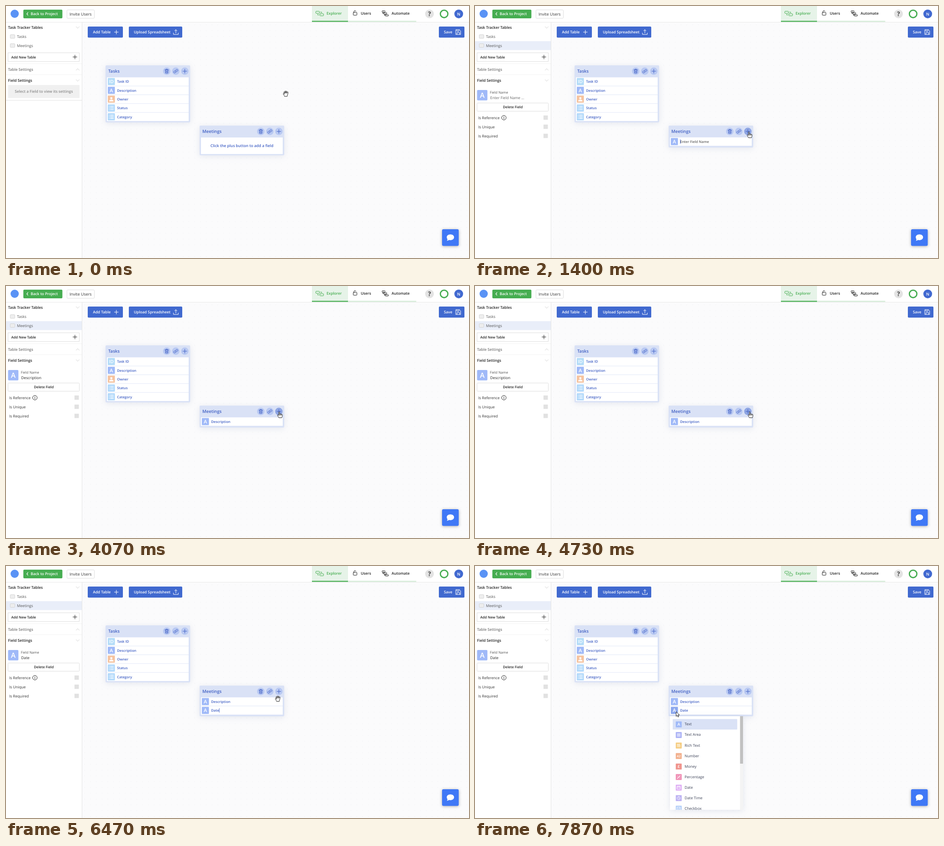
These frames come from a looping animation (1014 by 552 pixels, 8000 ms). An HTML page:

```html
<!DOCTYPE html>
<html lang="en">
<head>
<meta charset="utf-8">
<title>Table editor</title>
<style>
  html, body { margin: 0; width: 100%; height: 100%; overflow: hidden; background: #fff; }
  svg { display: block; width: 100%; height: 100%; }
  text { font: 600 8.24px "Open Sans", "Noto Sans", sans-serif; fill: #222; text-rendering: geometricPrecision; white-space: pre; }
  .reg { font-weight: 400; fill: #555; }
  .med { font-weight: 500; }
  .small { font-size: 7.6px; }
  .blue { fill: #3f5fc4; }
  .grey { fill: #777; }
  .white { fill: #fff; }
  .mid { text-anchor: middle; }
  .title { font-size: 9.5px; }
  .line { fill: none; stroke-linecap: round; stroke-linejoin: round; }
  .box { fill: #fff; stroke: #dedede; }
  .shadow { filter: drop-shadow(0 2px 7px rgba(70, 90, 150, .13)); }
</style>
</head>
<body>
<svg viewBox="0 0 1014 552">
  <defs>
    <pattern id="dots" width="12.68" height="12.68" patternUnits="userSpaceOnUse" x="166" y="35">
      <circle cx="6.3" cy="6.3" r=".7" fill="#ededf1"/>
    </pattern>
    <clipPath id="menuClip"><rect x="427" y="329" width="160" height="205"/></clipPath>
    <g id="plus"><path class="line" d="M-4.3 0H4.3M0-4.3V4.3"/></g>
    <g id="trash"><path class="line" d="M-4-3H4M-1.5-3V-4.4H1.5V-3M-3-3L-2.6 4.3H2.6L3-3M-1-1V2.5M1-1V2.5"/></g>
    <g id="link"><path class="line" d="M-.7 1.7A2.1 2.1 0 0 1-1-1.3L1-3.3A2.1 2.1 0 0 1 4-.3L2.8.9M.7-1.7A2.1 2.1 0 0 1 1 1.3L-1 3.3A2.1 2.1 0 0 1-4 .3L-2.8-.9"/></g>
    <g id="chevron"><path class="line" stroke="#c8c8c8" stroke-width=".8" d="M-3.5-1.7L0 1.7 3.5-1.7"/></g>
  </defs>

  <rect x="166" y="35" width="848" height="517" fill="#fbfbfc"/>
  <rect x="166" y="35" width="848" height="517" fill="url(#dots)"/>

  <!-- header -->
  <rect width="1014" height="35" fill="#fff"/>
  <path d="M0 35.5H1014" stroke="#e8e8e8"/>
  <circle cx="19" cy="17" r="9" fill="#5a93f5"/>
  <rect x="38" y="8" width="85.500" height="19" rx="2" fill="#46ad51"/>
  <path class="line" stroke="#fff" stroke-width="1.2" d="M48 14.500L45.500 17.300 48 20"/>
  <text class="white" x="54" y="20.300">Back to Project</text>
  <rect class="box" x="133.500" y="8.500" width="60" height="18.500" rx="2"/>
  <text class="reg" x="139" y="21" style="font-size:8.87px;fill:#333">Invite Users</text>
  <rect x="670" width="79" height="33" fill="#e6f3e8"/>
  <rect x="670" y="32.500" width="79" height="2.200" fill="#46ad51"/>
  <rect x="749" y="32.500" width="149.500" height="2.200" fill="#d3ecd6"/>
  <g class="line" stroke="#46ad51" stroke-width="1">
    <rect x="678.500" y="11.500" width="8" height="4.500" rx="1"/>
    <rect x="687.500" y="17" width="8" height="4.500" rx="1"/>
    <path d="M688.500 13.500H691.500V15M682.500 18V19.500H685.500"/>
  </g>
  <text x="702" y="19.200" style="fill:#46ad51">Explorer</text>
  <g class="line" stroke="#222">
    <rect x="760.500" y="14" width="8" height="6.200" rx="1"/>
    <path d="M762 14V12.300a2.200 2.200 0 0 1 4.300-.6"/>
    <rect x="823.500" y="10.500" width="7" height="3" rx="1"/>
    <rect x="827" y="14.700" width="7" height="3" rx="1"/>
    <rect x="830.500" y="19" width="7" height="3" rx="1"/>
    <path d="M825 13.500V16.200H827M829 17.700V20.500H830.500"/>
  </g>
  <text x="777" y="19.200">Users</text>
  <text x="844.500" y="19.200">Automate</text>
  <circle cx="927.500" cy="17.300" r="9.500" fill="#e3e3e3"/>
  <text class="mid" x="927.500" y="22.300" style="font-size:13.500px;font-weight:700;fill:#444">?</text>
  <circle cx="959.500" cy="17.300" r="8.200" fill="none" stroke="#46ad51" stroke-width="2.800"/>
  <circle cx="991.500" cy="17.300" r="9.600" fill="#4169d0"/>
  <text class="white mid" x="991.500" y="20.500" style="font-size:8.87px">N</text>

  <!-- canvas buttons -->
  <g fill="#4069cf">
    <rect x="179" y="45" width="77" height="24.300" rx="2"/>
    <rect x="269" y="45" width="117" height="24.300" rx="2"/>
    <rect x="948" y="45" width="56" height="24.300" rx="2"/>
  </g>
  <text class="white" x="190.500" y="60.200">Add Table</text>
  <text class="white" x="280" y="60.200">Upload Spreadsheet</text>
  <text class="white" x="959" y="60.200">Save</text>
  <g stroke="#fff" class="line">
    <use href="#plus" x="241.700" y="57.200"/>
    <path d="M366.800 59V62.300H377.300V59M372 59.300V52M369.300 54.500L372 51.800 374.700 54.500"/>
    <path d="M985.300 52H993.300L995.700 54.300V62.300H985.300ZM987.500 52V55.300H992V52M987.500 62.300V58.300H993.500V62.300"/>
  </g>

  <!-- sidebar -->
  <rect y="36" width="166" height="516" fill="#fff"/>
  <path d="M166.500 36V552" stroke="#e4e4e4"/>
  <path d="M0 126.500H166M0 150.500H166" stroke="#f3f3f3"/>
  <rect id="highlight" y="77" width="166" height="19.500" fill="#e9eef9"/>
  <text x="4.500" y="50">Task Tracker Tables</text>
  <use href="#chevron" x="157" y="47"/>
  <g fill="#eee" stroke="#cdcdcd" stroke-width=".8">
    <rect x="9.300" y="62.800" width="10" height="8" rx="1"/>
    <rect x="9.300" y="82.600" width="10" height="8" rx="1"/>
  </g>
  <text class="reg" x="24" y="70">Tasks</text>
  <text class="reg" x="24" y="89.800">Meetings</text>
  <rect class="box" x="4.500" y="102.500" width="156" height="19"/>
  <text class="small" x="11.500" y="114.800">Add New Table</text>
  <use href="#plus" x="151" y="111.700" stroke="#222"/>
  <text class="grey" x="4.500" y="142">Table Settings</text>
  <use href="#chevron" transform="translate(157 139) scale(1 -1)"/>
  <text x="4.500" y="166">Field Settings</text>
  <use href="#chevron" x="157" y="163"/>
  <g id="noField">
    <rect x="4.500" y="173" width="156.500" height="28.500" rx="1" fill="#f0f0f0"/>
    <text class="mid" x="82.800" y="190.300" style="fill:#8a8a8a">Select a Field to view its settings</text>
    <path d="M0 206.500H166" stroke="#e2e2e2"/>
  </g>
  <g id="fieldPanel">
    <rect x="4.500" y="184" width="22.700" height="22.700" rx="2" fill="#9fb9f8"/>
    <text class="white mid" x="15.800" y="201" style="font-size:15.500px">A</text>
    <text class="reg small" x="32.500" y="191.500">Field Name</text>
    <text class="med" id="panelName" x="33.300" y="203.600"></text>
    <rect class="box" x="4.500" y="212.500" width="156" height="18" rx="1"/>
    <text class="small mid" x="82.800" y="224.300">Delete Field</text>
    <text class="reg" x="7" y="248" style="fill:#333">Is Reference</text>
    <text class="reg" x="7" y="267.800" style="fill:#333">Is Unique</text>
    <text class="reg" x="7" y="287.600" style="fill:#333">Is Required</text>
    <circle cx="63.300" cy="244.700" r="4.900" fill="none" stroke="#222"/>
    <path d="M63.300 243.800V247.300M63.300 241.700V242.700" stroke="#222" stroke-width="1.100"/>
    <path d="M150 244.500h9.500M150 264.500h9.500M150 284.500h9.500" stroke="#e1e1e1" stroke-width="9.500"/>
  </g>

  <g id="tables"></g>
  <g id="menu"></g>

  <!-- chat -->
  <rect x="955" y="489" width="36.500" height="36.500" rx="3" fill="#3f78f6" style="filter:drop-shadow(0 1px 3px rgba(0,0,0,.3))"/>
  <path fill="#fff" d="M973.300 500.300c4.700 0 8 2.800 8 6.300s-3.300 6.300-8 6.300c-1.200 0-2.300-.2-3.300-.5-1.200 1-2.700 1.700-4.500 1.800.8-1 1.300-2 1.400-3.300-1-1.100-1.600-2.600-1.600-4.300 0-3.500 3.300-6.300 8-6.300Z"/>

  <g id="cursor" fill="#fff" stroke="#111" stroke-width=".9" stroke-linejoin="round">
    <path id="grab" d="M-3 6C-3.400 4-5 2.700-5.900.7-6-.6-4.700-.7-3.900.4L-3 1.400-4.600-2.900C-4.700-4.200-3.300-4.400-2.900-3.200L-2-1-2.300-4.900C-2.100-6.200-.7-6.200-.4-4.900L-.2-1.200.6-4.900C1-6 2.300-5.800 2.200-4.500L1.900-.8 3.200-3.400C3.800-4.400 5-3.900 4.800-2.700 4.400-.8 4.300 1.300 3.500 3 3 4 2.900 5 2.900 6Z"/>
    <path id="point" d="M-2.500 6.600C-3.200 4.600-5 3-5.600 1 -5.500-.1-4.400-.2-3.600.7L-2.700 1.700V-5.600C-2.600-6.900-.9-6.900-.8-5.600V-1.700C-.3-2.600.9-2.500 1.200-1.400 1.800-2.100 2.900-1.900 3.100-.8 3.800-1.400 5-1 5.100.1V2.700C5.100 4 4.200 5 4 6.600ZM-.8-1.700V1.500M1.200-1.400V1.500M3.100-.8V1.500"/>
    <path id="beam" fill="none" d="M-2-5.500Q0-5.500 0-4.500 0-5.500 2-5.500M0-4.500V4.500M-2 5.500Q0 5.500 0 4.500 0 5.500 2 5.500"/>
    <path id="arrow" d="M0-7V3.300L2.400 1.200 4 4.800 5.700 4.100 4.100.5H7.300Z"/>
  </g>
</svg>
<script>
const LOOP = 8000, TICK = 1000 / 15;
const $ = id => document.getElementById(id);

const rect = (x, y, w, h, fill, extra = '') =>
  `<rect x="${x}" y="${y}" width="${w}" height="${h}" fill="${fill}" ${extra}/>`;
const text = (x, y, str, cls, extra = '') =>
  `<text x="${x}" y="${y}" class="${cls}" ${extra}>${str}</text>`;
const strokes = (d, width = 1.1) =>
  `<path class="line" stroke="#fff" stroke-width="${width}" d="${d}"/>`;
const letters = (str, size) => text(0, size * .36, str, 'white mid', `style="font-size:${size}px"`);

// Field type badges, drawn around their centre.
const types = {
  id: ['#b3dcf8', letters('ID', 10)],
  text: ['#9fb9f8', letters('A', 11)],
  owner: ['#f5c3a0', '<circle cy="-2.200" r="2.400" fill="#fff"/><path fill="#fff" d="M-4.500 5V3.500Q-4 1 0 1T4.500 3.500V5Z"/>'],
  list: ['#b0d8fa', strokes('M-4.700-3.500h.3M-4.700 0h.3M-4.700 3.500h.3M-2-3.500H4.500M-2 0H4.500M-2 3.500H4.500', 1.4)],
  area: ['#aab1f5', strokes('M-4-3H4M-4 0H4M-4 3H4', 1.4)],
  rich: ['#f5cc80', strokes('M-4-3H0M-4 0H4M-4 3H4M2-4V-2', 1.4)],
  number: ['#f2b08d', letters('42', 8.5)],
  money: ['#f0948d', letters('£', 10)],
  percent: ['#f091b6', strokes('M-3.500 3.500L3.500-3.500M-3-2.500h.1M3 2.500h.1', 1.6)],
  date: ['#dfaff5', strokes('M-4-3.500H4V4H-4ZM-4-1.200H4M-2-4.500V-3M2-4.500V-3')],
  time: ['#bdb3f3', strokes('M0-4.200A4.200 4.200 0 1 1-.1-4.200ZM0-2V.3L2 1.500')],
  check: ['#b5d0f8', strokes('M-4-4H4V4H-4ZM-2 0L-.5 1.800 2.300-1.800')]
};
const badge = (type, x, y, size, id = '') => {
  const [color, mark] = types[type];
  return `<g transform="translate(${x} ${y}) scale(${size / 15.5})">` +
    rect(-7.75, -7.75, 15.5, 15.5, color, `rx="1" ${id}`) + mark + '</g>';
};

const ROW = 19.3;
const rowY = (top, i) => top + 35.2 + ROW * i;
const row = (x, top, i, type, label, id = '') => {
  const y = rowY(top, i);
  return `<g ${id && `id="${id}"`}>` + rect(x + 3, y - 9.2, 179, 18.5, '#fff') +
    badge(type, x + 12.7, y, 15.5, id && `id="${id}Badge"`) +
    text(x + 25.3, y + 2.8, label, 'small blue', id && `id="${id}Text"`) + '</g>';
};
const frame = (x, y, height, id) =>
  rect(x, y, 185.3, height, '#dae2f6', `rx="2" class="shadow" id="${id}"`);
const head = (x, y, name, id) => text(x + 6, y + 16, name, 'title blue') +
  ['trash', 'link', 'plus'].map((icon, i) => {
    const at = `${x + 134 + i * 19.8} ${y + 12.8}`;
    return `<g transform="translate(${at})"><circle r="8.200" fill="#b9c9f2" id="${id}${icon}"/>` +
      `<use href="#${icon}" stroke="#3f5fc4"/></g>`;
  }).join('');

const taskFields = [['id', 'Task ID'], ['text', 'Description'], ['owner', 'Owner'], ['list', 'Status'], ['list', 'Category']];
$('tables').innerHTML =
  frame(218, 130, 125, 'tasksFrame') + head(218, 130, 'Tasks', 'tasks') +
  taskFields.map(([type, label], i) => row(218, 130.3, i, type, label)).join('') +
  frame(424, 262, 65, 'meetFrame') + head(424, 262, 'Meetings', 'meet') +
  '<g id="empty">' + rect(427, 288, 179, 36.3, '#fff') +
  text(516.7, 308.5, 'Click the plus button to add a field', 'mid blue', 'style="font-size:8.35px"') + '</g>' +
  row(424, 261.8, 0, 'text', '', 'first') + row(424, 261.8, 1, 'text', '', 'second') +
  '<path id="clear" class="line" stroke="#888" d="M592.500 312.300l8 8m0-8l-8 8"/>' +
  rect(0, 0, .9, 9.5, '#3f5fc4', 'id="caret"');

const options = [['text', 'Text'], ['area', 'Text Area'], ['rich', 'Rich Text'], ['number', 'Number'], ['money', 'Money'],
  ['percent', 'Percentage'], ['date', 'Date'], ['time', 'Date Time'], ['check', 'Checkbox']];
$('menu').innerHTML = rect(427, 329, 160, 205, '#fff', 'class="shadow"') +
  '<g clip-path="url(#menuClip)">' + rect(580.5, 329, 6.5, 205, '#f4f4f4') +
  rect(580.5, 329, 6.5, 104, '#c1c1c1') + rect(433, 335.3, 141.3, 23, '#dae2f6', 'rx="1"') +
  options.map(([type, label], i) => {
    const y = 346.8 + 23.05 * i;
    return badge(type, 446.2, y + .3, 13) + text(459, y + 2.6, label, 'med', 'style="fill:#3c4257"');
  }).join('') + '</g>';

// Moments at which each next letter appears.
const typing = {
  first: ['Description', [2000, 2270, 2400, 2530, 2600, 2730, 2800, 2930, 3070, 3130, 3200]],
  second: ['Date', [5530, 5730, 6070, 6200]]
};
const typed = (field, t) => {
  const [word, times] = typing[field];
  return word.slice(0, times.filter(time => t >= time).length);
};

// [start, end, from, control, to]
const moves = [
  [267, 1133, [613, 192], [651, 236], [601.5, 282]],
  [4000, 4067, [601.5, 282], [601, 282], [600, 282]],
  [4067, 4133, [600, 282], [589, 271], [578, 260]],
  [4200, 4467, [578, 260], [594, 265], [603.5, 282]],
  [5067, 5133, [603.5, 282], [605, 282], [606, 282]],
  [6333, 7200, [606, 282], [525, 352], [440.5, 326]]
];
const ease = p => p * p * (3 - 2 * p);
function cursorAt(t) {
  const now = Math.floor((t + 4) / TICK) * TICK;
  const [start, end, a, b, c] = moves.findLast(move => now + 1 >= move[0]) || [0, 1, ...moves[0].slice(2)];
  const p = now < moves[0][0] - 1 ? 0 : ease(Math.min(1, Math.max(0, (now - start) / (end - start))));
  return a.map((v, i) => (1 - p) ** 2 * v + 2 * p * (1 - p) * b[i] + p * p * c[i]);
}

const within = (t, from, to) => t >= from && t < to;
const show = (id, on) => $(id).setAttribute('visibility', on ? 'visible' : 'hidden');
const fill = (id, color) => $(id).setAttribute('fill', color);

function setField(field, value) {
  const label = $(field + 'Text');
  label.textContent = value || 'Enter Field Name';
  label.style.fill = value ? '' : '#666';
}

function draw(t) {
  const opened = t >= 1400, second = t >= 4870;
  const active = second ? 'second' : 'first';
  const value = typed(active, t);
  show('highlight', opened);
  show('noField', !opened);
  show('fieldPanel', opened);
  show('empty', !opened);
  show('first', opened);
  show('second', second);
  $('meetFrame').setAttribute('height', second ? 67.2 : opened ? 47.9 : 65);
  setField('first', typed('first', t));
  setField('second', typed('second', t));
  $('panelName').textContent = value || 'Enter Field Name ...';
  $('panelName').style.fill = value ? '#222' : '#666';

  const caretOn = opened && t < 7530 && ![[1930, 2000], [3730, 4270], [4730, 4870], [5400, 5530], [6730, 7270]]
    .some(([from, to]) => within(t, from, to));
  const width = value ? $(active + 'Text').getComputedTextLength() : 0;
  show('caret', caretOn);
  $('caret').setAttribute('x', 449.3 + width);
  $('caret').setAttribute('y', rowY(261.8, second ? 1 : 0) - 4.8);

  const [x, y] = cursorAt(t);
  const onPlus = Math.hypot(x - 2 - 597.6, y - 6 - 274.8) < 8.6;
  const onBadge = t > 6400 && x < 446;
  const onRow = second && y > 307 && y < 331 && x < 606;
  const shape = t >= 7600 ? 'arrow' : onPlus || onBadge ? 'point' : onRow ? 'beam' : 'grab';
  ['grab', 'point', 'beam', 'arrow'].forEach(id => show(id, id === shape));
  $('cursor').setAttribute('transform', `translate(${x} ${y})`);
  fill('meetplus', onPlus ? '#8fa6e3' : '#b9c9f2');
  fill('secondBadge', onBadge ? '#8ca8ee' : '#9fb9f8');
  show('clear', onRow && t < 7530);

  const fade = Math.floor((t + 4 - 7533) / TICK) / 4;
  $('menu').setAttribute('opacity', Math.min(1, Math.max(0, fade)));
}

const begin = performance.now();
function tick() {
  draw((performance.now() - begin) % LOOP);
  requestAnimationFrame(tick);
}
tick();
</script>
</body>
</html>
```
